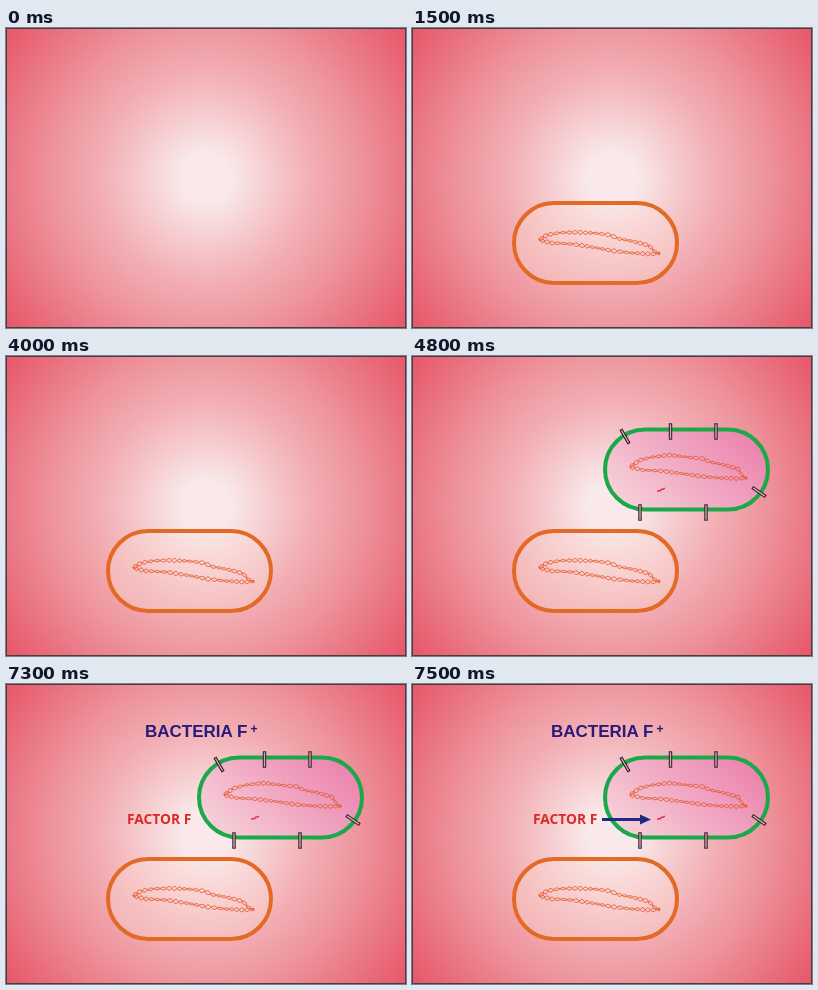
Write an HTML page that moves like this. It is 400x300 px and loops after 8 s.

```html
<!DOCTYPE html>
<html lang="en">
<head>
<meta charset="utf-8">
<title>Bacteria F+ and F−</title>
<style>
html, body { margin: 0; width: 100%; height: 100%; overflow: hidden; }
svg { display: block; width: 400px; height: 300px; }
.title { font: bold 17px "Liberation Sans", Arial, sans-serif; fill: #2a1a7a; }
.sign { font-size: 12px; }
.factor { font: bold 13.8px "Open Sans", sans-serif; fill: #dc2a28; }
.dna path { fill: none; stroke: #e65c30; stroke-width: 1; }
.pili rect { fill: #dba3b4; stroke: #2c1c22; stroke-width: 1; }
.cell { stroke-width: 4; }
</style>
</head>
<body>
<svg viewBox="0 0 400 300">
  <defs>
    <radialGradient id="glow" gradientUnits="userSpaceOnUse" cx="200" cy="150" r="250">
      <stop offset=".1" stop-color="#f9e9ea"/>
      <stop offset=".25" stop-color="#f6cdd0"/>
      <stop offset=".42" stop-color="#f2afb4"/>
      <stop offset=".62" stop-color="#ee939c"/>
      <stop offset=".8" stop-color="#ea7684"/>
      <stop offset="1" stop-color="#e75669"/>
    </radialGradient>
    <linearGradient id="pink" x1="0" y1=".8" x2="1" y2=".3">
      <stop offset="0" stop-color="#f7d3da"/>
      <stop offset=".5" stop-color="#f1abc5"/>
      <stop offset="1" stop-color="#ec84ae"/>
    </linearGradient>
  </defs>

  <rect width="400" height="300" fill="url(#glow)"/>

  <g data-from="1500">
    <rect class="cell" x="102" y="175" width="163" height="80" rx="40" fill="#fae0d8" fill-opacity=".3" stroke="#e26a26"/>
    <g class="dna" id="dnaMinus"></g>
  </g>

  <text class="title" data-from="2500" data-to="4000" x="67" y="149">BACTERIA F<tspan class="sign" x="172" dy="-4">−</tspan></text>

  <g data-from="4800">
    <rect class="cell" x="193" y="73.5" width="163" height="80" rx="40" fill="url(#pink)" stroke="#1aa84a"/>
    <g class="dna" id="dnaPlus"></g>
    <g class="pili" id="pili"></g>
    <path d="M245 135.5l2-1 1 .5 2-2 1 .3 2-1.3" fill="none" stroke="#e4243c" stroke-width="1.2"/>
  </g>

  <text class="title" data-from="5800" x="139" y="53">BACTERIA F<tspan class="sign" x="244.5" dy="-4">+</tspan></text>
  <text class="factor" data-from="7300" x="121" y="140.3">FACTOR F</text>
  <path data-from="7500" d="M190 134h38v-3.5l11 5-11 5v-3.5h-38z" fill="#1c2a80"/>

  <rect x=".5" y=".5" width="399" height="299" fill="none" stroke="#4a3c40"/>
</svg>
<script>
const LOOP = 8000;
const SVG = "http://www.w3.org/2000/svg";

function add(parent, tag, attrs) {
  const el = document.createElementNS(SVG, tag);
  for (const key in attrs) el.setAttribute(key, attrs[key]);
  parent.append(el);
  return el;
}

// Two strands twisting around a closed outline
function drawHelix(id, points) {
  const group = document.getElementById(id);
  const guide = add(group, "path", { d: "M" + points.join("L") + "Z" });
  const length = guide.getTotalLength();
  const turns = 44;
  for (const side of [-1, 1]) {
    let d = "";
    for (let s = 0; s < length; s += 0.7) {
      const p = guide.getPointAtLength(s);
      const q = guide.getPointAtLength((s + 0.5) % length);
      const angle = Math.atan2(q.y - p.y, q.x - p.x);
      const width = 1.5 + 0.5 * Math.sin(s * 0.19);
      const off = side * width * Math.sin(turns * Math.PI * s / length + 0.5 * Math.sin(s * 0.13));
      const x = p.x - off * Math.sin(angle), y = p.y + off * Math.cos(angle);
      d += (d ? "L" : "M") + x.toFixed(2) + " " + y.toFixed(2);
    }
    add(group, "path", { d: d + "Z" });
  }
  guide.remove();
}

drawHelix("dnaMinus", [
  [127, 212], [135, 207], [148, 204.7], [165, 204.3], [182, 205], [198, 207], [206, 210.5],
  [222, 213.5], [237, 217.5], [242, 223], [248, 225.5],
  [238, 226], [220, 225], [200, 222.7], [180, 219], [160, 216], [140, 215]
]);
drawHelix("dnaPlus", [
  [218, 111], [227, 104.5], [240, 101], [258, 99], [274, 101], [290, 102.5], [298, 106],
  [313, 109], [326, 113], [330, 119], [335, 122.5],
  [325, 122.5], [308, 122], [290, 120.5], [270, 117.5], [250, 115], [231, 114]
]);

for (const [x, y, turn] of [
  [258.5, 75.5, 0], [304, 75.5, 0], [228, 156.5, 0],
  [294, 156.5, 0], [213, 80.5, -30], [347, 136, -55]
]) {
  add(document.getElementById("pili"), "rect", {
    x: -1.2, y: -7.7, width: 2.4, height: 15.4,
    transform: `translate(${x} ${y}) rotate(${turn})`
  });
}

const parts = [...document.querySelectorAll("[data-from]")];
const start = performance.now();

function draw(now) {
  const t = Math.max(0, now - start) % LOOP;
  for (const part of parts) {
    const { from, to = LOOP } = part.dataset;
    part.style.visibility = t >= +from && t < +to ? "visible" : "hidden";
  }
  requestAnimationFrame(draw);
}
draw(start);
</script>
</body>
</html>
```
